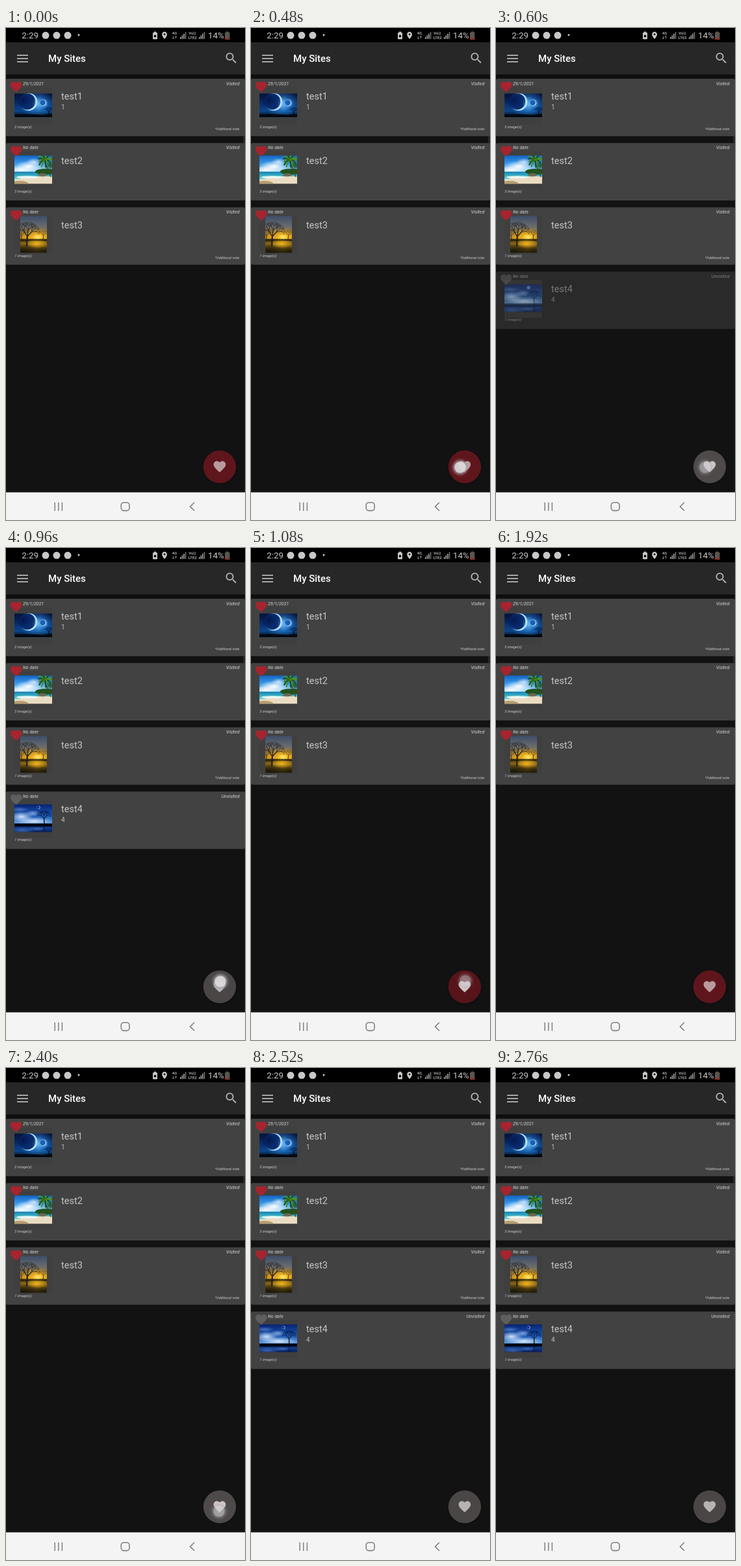
These frames come from a looping animation (368x756 px, 2.88 s). An HTML page with a canvas:

```html
<!DOCTYPE html>
<html lang="en">
<head>
<meta charset="utf-8">
<title>My Sites</title>
<style>
html, body { margin: 0; width: 100%; height: 100%; overflow: hidden; background: #121212; }
canvas { display: block; width: 368px; height: 756px; }
</style>
</head>
<body>
<canvas id="stage"></canvas>
<script>
const W = 368, H = 756, LOOP = 2880, STEP = 120;
const canvas = document.getElementById('stage');
const ctx = canvas.getContext('2d');
const dpr = window.devicePixelRatio || 1;
canvas.width = W * dpr;
canvas.height = H * dpr;

const HEART = new Path2D('M12 21.35l-1.45-1.32C5.4 15.36 2 12.28 2 8.5 2 5.42 4.42 3 7.5 3c1.74 0 3.41.81 4.5 2.09C13.09 3.81 14.76 3 16.5 3 19.58 3 22 5.42 22 8.5c0 3.78-3.4 6.86-8.55 11.54L12 21.35z');
const SEARCH = new Path2D('M15.5 14h-.79l-.28-.27A6.47 6.47 0 0 0 16 9.5 6.5 6.5 0 1 0 9.5 16c1.61 0 3.09-.59 4.23-1.57l.27.28v.79l5 4.99L20.49 19l-4.99-5zm-6 0C7.01 14 5 11.99 5 9.5S7.01 5 9.5 5 14 7.01 14 9.5 11.99 14 9.5 14z');
const PIN = new Path2D('M12 2C8.13 2 5 5.13 5 9c0 5.25 7 13 7 13s7-7.75 7-13c0-3.87-3.13-7-7-7zm0 9.5a2.5 2.5 0 1 1 0-5 2.5 2.5 0 0 1 0 5z');

const CARDS = [
  { title: 'test1', sub: '1', date: '29/1/2021', count: 2, liked: true, note: true, photo: moonNight },
  { title: 'test2', sub: '', date: 'No date', count: 3, liked: true, photo: beach },
  { title: 'test3', sub: '', date: 'No date', count: 1, liked: true, note: true, photo: sunset },
  { title: 'test4', sub: '4', date: 'No date', count: 1, liked: false, photo: blueLake }
];

// Finger marks: time range, position, opacity
const TOUCHES = [
  [480, 600, 322, 675, 0.8], [600, 720, 322, 675, 0.35],
  [960, 1080, 330, 666, 0.8], [1080, 1200, 330, 665, 0.3],
  [2280, 2400, 328, 681, 0.8], [2400, 2520, 328, 681, 0.4]
];

function rect(x, y, w, h, color, r = 0) {
  ctx.fillStyle = color;
  ctx.beginPath();
  ctx.roundRect(x, y, w, h, r);
  ctx.fill();
}

function ellipse(x, y, rx, ry, color) {
  ctx.fillStyle = color;
  ctx.beginPath();
  ctx.ellipse(x, y, rx, ry, 0, 0, 7);
  ctx.fill();
}

function disc(x, y, r, color) {
  ellipse(x, y, r, r, color);
}

function line(points, color, width) {
  ctx.strokeStyle = color;
  ctx.lineWidth = width;
  ctx.beginPath();
  points.forEach(([x, y]) => ctx.lineTo(x, y));
  ctx.stroke();
}

function text(str, x, y, size, color, style = '', align = 'left') {
  ctx.font = `${style} ${size}px Roboto, sans-serif`;
  ctx.textAlign = align;
  ctx.fillStyle = color;
  ctx.fillText(str, x, y);
}

function icon(path, x, y, scale, color) {
  ctx.save();
  ctx.translate(x, y);
  ctx.scale(scale, scale);
  ctx.fillStyle = color;
  ctx.fill(path, 'evenodd');
  ctx.restore();
}

function vertical(y, h, ...stops) {
  const g = ctx.createLinearGradient(0, y, 0, y + h);
  stops.forEach(([at, color]) => g.addColorStop(at, color));
  return g;
}

// Soft round or flattened light; rgb is a "r,g,b" string
function glow(x, y, rx, ry, rgb, alpha) {
  ctx.save();
  ctx.translate(x, y);
  ctx.scale(1, ry / rx);
  const g = ctx.createRadialGradient(0, 0, 0, 0, 0, rx);
  g.addColorStop(0, `rgba(${rgb},${alpha})`);
  g.addColorStop(1, `rgba(${rgb},0)`);
  disc(0, 0, rx, g);
  ctx.restore();
}

function photo(x, y, w, h, paint) {
  ctx.save();
  ctx.translate(x, y);
  ctx.beginPath();
  ctx.rect(0, 0, w, h);
  ctx.clip();
  paint(w, h);
  ctx.restore();
}

function branch(x, y, length, angle, depth, width, color) {
  const x2 = x + Math.cos(angle) * length, y2 = y + Math.sin(angle) * length;
  line([[x, y], [x2, y2]], color, width);
  if (!depth) return;
  for (const turn of [-0.6, 0.08, 0.7])
    branch(x2, y2, length * 0.66, angle + turn, depth - 1, width * 0.6, color);
}

function crescent(x, y, r, light, shade) {
  disc(x, y, r, light);
  disc(x - r * 0.17, y - r * 0.04, r * 0.93, shade);
}

function moonNight(y) {
  photo(13, y + 22.5, 58, 36.5, (w, h) => {
    rect(0, 0, w, h, vertical(0, h, [0, '#051035'], [0.45, '#08306f'], [0.75, '#0a4587'], [0.88, '#06203f'], [1, '#020812']));
    glow(35, 16, 27, 22, '45,145,240', 0.9);
    crescent(22, 13, 13.5, '#b9e3ff', '#082c70');
    glow(14, 10, 14, 12, '4,18,62', 0.7);
    glow(37, 16, 10, 12, '150,215,255', 0.6);
    glow(45, 15, 8, 8, '120,200,255', 0.8);
    crescent(44.5, 14.5, 4.5, '#d5efff', '#1b60b2');
    ellipse(18, 37, 42, 5, '#020812');
    branch(53, 35, 6, -1.6, 3, 1.2, '#020a19');
    ellipse(53, 36, 12, 4, '#020812');
  });
}

function beach(y) {
  photo(13, y + 19, 58, 43.5, (w, h) => {
    rect(0, 0, w, h, vertical(0, h, [0, '#1263c0'], [0.3, '#3c9bea'], [0.55, '#b4e0f8']));
    glow(22, 17, 22, 9, '255,255,255', 1);
    glow(10, 22, 18, 6, '255,255,255', 0.9);
    glow(30, 10, 12, 6, '255,255,255', 0.7);
    rect(0, 25, w, 11, vertical(25, 11, [0, '#1380b4'], [1, '#5ed6cf']));
    ellipse(48, 25, 16, 4.5, '#21511f');
    ellipse(44, 42, 46, 10, '#eadcc2');
    ellipse(20, 33.5, 17, 2, '#eaf8f1');
    ellipse(8, 43, 13, 4, '#b89f72');
    ellipse(43, 30, 7, 2.5, '#6d6a55');
    line([[56, 33], [51, 20], [46, 8]], '#4d4026', 1.3);
    for (let i = 0; i < 13; i++) {
      const a = i * 0.49, reach = 12 + 3 * Math.sin(i * 5);
      ctx.strokeStyle = i % 2 ? '#174e18' : '#4c8f24';
      ctx.lineWidth = 2;
      ctx.beginPath();
      ctx.moveTo(47, 7);
      ctx.quadraticCurveTo(47 + Math.cos(a) * 9, 4 + Math.sin(a) * 6, 47 + Math.cos(a) * reach, 9 + Math.sin(a) * 10);
      ctx.stroke();
    }
    glow(56, 16, 10, 9, '20,75,22', 0.9);
  });
}

function sunset(y) {
  photo(22, y + 13, 41, 57, (w, h) => {
    rect(0, 0, w, h, vertical(0, h, [0, '#3d4c67'], [0.28, '#666b70'], [0.45, '#9c793a'], [0.6, '#d99a16'], [0.66, '#3b2e0e'], [0.74, '#8c6815'], [1, '#29230c']));
    glow(27, 31, 24, 12, '255,190,25', 0.95);
    glow(27, 33, 9, 5, '255,242,130', 0.9);
    rect(0, 36, w, 2.5, '#2a250e');
    glow(25, 43, 18, 7, '255,190,30', 0.9);
    glow(5, 55, 25, 12, '24,22,9', 0.9);
    glow(38, 55, 15, 8, '28,24,8', 0.8);
    branch(10, 47, 15, -1.52, 4, 2.2, '#211d1c');
    branch(35, 38, 7, -1.5, 3, 0.9, '#3b2d1c');
    branch(2, 40, 9, -1.6, 3, 1, '#292420');
  });
}

function blueLake(y) {
  photo(13, y + 19.5, 58, 43, (w, h) => {
    rect(0, 0, w, h, vertical(0, h, [0, '#072372'], [0.4, '#1a56b4'], [0.7, '#6ba6e2'], [0.8, '#123f94'], [1, '#071f5c']));
    glow(11, 19, 17, 8, '225,238,255', 0.9);
    glow(28, 14, 12, 5, '200,222,255', 0.6);
    glow(30, 26, 27, 6, '225,240,255', 0.9);
    glow(8, 8, 15, 4, '130,170,230', 0.5);
    crescent(37, 5, 2.5, '#e4efff', '#0f3589');
    rect(0, 29.5, w, 5, '#020714');
    glow(12, 40, 20, 5, '90,140,215', 0.6);
    glow(35, 38, 15, 3, '110,160,230', 0.5);
    branch(46, 32, 9, -1.62, 4, 1.3, '#030a1c');
    branch(46, 34, 4, 1.6, 2, 1, '#061434');
  });
}

function drawCard(card, index) {
  const y = 78 + index * 98.75;
  rect(0, y, W, 88.3, '#424242', 2.5);
  rect(13, y + 13, 58, 58, '#3f3f3f');
  card.photo(y);
  icon(HEART, 5.2, y + 1.9, 0.87, card.liked ? '#a7242f' : '#5e5e5e');
  text(card.date, 26, y + 9.6, 7, '#d2d2d2', 'italic');
  text(card.liked ? 'Visited' : 'Unvisited', 359.5, y + 9.6, 7, '#d2d2d2', 'italic', 'right');
  text(card.title, 85, y + 32.1, 14.5, '#c6c6c6');
  text(card.sub, 85, y + 47, 10, '#bdbdbd');
  text(`${card.count} image(s)`, 13.3, y + 76.2, 5.7, '#cacaca', 'italic');
  if (card.note) text('*Addtional note', 359.5, y + 79.3, 5.6, '#cacaca', 'italic', 'right');
}

function signal(x) {
  for (let i = 0; i < 4; i++)
    rect(x + i * 2.6, 14 - i * 2.6, 1.5, 2.8 + i * 2.6, i < 3 ? '#b4b4b4' : '#777');
}

function drawStatusBar() {
  const c = '#c8c8c8';
  rect(0, 0, W, 22, '#000');
  text('2:29', 24.3, 16.2, 13.4, c);
  for (const x of [61, 78, 95]) disc(x, 11.3, 5.5, c);
  disc(112, 10.8, 1.5, c);
  rect(226, 7, 7, 10.2, c, 1);
  rect(228, 5.6, 3, 2, c);
  disc(229.5, 12.4, 1.9, '#111');
  icon(PIN, 237.4, 4.7, 0.56, c);
  text('4G', 259.5, 10.2, 6, c, '500', 'center');
  line([[257.5, 12.5], [257.5, 16.5]], '#999', 0.8);
  line([[256, 15], [257.5, 16.7], [259, 15]], '#999', 0.8);
  line([[261.5, 12.5], [261.5, 16.5]], '#999', 0.8);
  line([[260, 14], [261.5, 12.3], [263, 14]], '#999', 0.8);
  signal(268);
  text('Vo))', 287, 10.2, 6, c, '500', 'center');
  text('LTE2', 287.2, 16.7, 6, c, '500', 'center');
  signal(297);
  text('14%', 311, 16.2, 13.4, c);
  rect(337, 6.5, 7.5, 11.5, '#5b5350', 1.2);
  rect(339, 5.4, 3.5, 2, '#5b5350');
  rect(337, 15.5, 7.5, 2.5, '#8d2f25', 1);
}

function drawAppBar() {
  rect(0, 71.5, W, 6.5, vertical(71.5, 6.5, [0, '#0b0b0b'], [1, '#121212']));
  rect(0, 22, W, 49.5, '#272727');
  for (const y of [41, 46, 51]) rect(17, y, 17, 1.8, '#b4b4b4');
  text('My Sites', 65, 52.2, 15, '#fff', '500');
  icon(SEARCH, 335.7, 35.2, 0.93, '#b4b4b4');
}

function drawNavBar() {
  rect(0, 713.5, W, H - 713.5, '#f4f4f4');
  for (const x of [75.2, 80.8, 86.4]) line([[x, 729], [x, 742]], '#808080', 1.5);
  ctx.lineWidth = 1.6;
  ctx.strokeStyle = '#808080';
  ctx.beginPath();
  ctx.roundRect(177.3, 729.2, 12.8, 12.4, 4);
  ctx.stroke();
  line([[290, 729], [283.5, 735.4], [290, 741.8]], '#808080', 1.6);
}

function drawFab(filterOn, pressed) {
  ctx.save();
  ctx.shadowColor = 'rgba(0,0,0,.35)';
  ctx.shadowBlur = 4 * dpr;
  ctx.shadowOffsetY = dpr;
  disc(329, 674.2, 25.2, filterOn ? '#5e161c' : '#494645');
  ctx.restore();
  if (pressed) disc(329, 674.2, 25.2, filterOn ? 'rgba(0,0,0,.08)' : 'rgba(255,255,255,.02)');
  icon(HEART, 317.8, 662.8, 0.93, pressed ? '#cfc3c3' : filterOn ? '#b99b9d' : '#b6b3b2');
}

function drawTouch([, , x, y, alpha]) {
  ctx.save();
  ctx.globalAlpha = alpha;
  glow(x, y, 15, 15, '200,200,215', 0.9);
  disc(x, y, 11.3, 'rgba(150,150,160,.55)');
  disc(x, y, 8.8, '#e6e4e4');
  ctx.restore();
}

function lastCardAlpha(t) {
  if (t >= 600 && t < 720) return 0.5;
  return t >= 720 && t < 1080 || t >= 2520 ? 1 : 0;
}

function draw(t) {
  const touch = TOUCHES.find(([from, to]) => t >= from && t < to);
  const filterOn = !(t >= 600 && t < 1080 || t >= 2400);
  ctx.setTransform(dpr, 0, 0, dpr, 0, 0);
  rect(0, 0, W, H, '#121212');
  drawStatusBar();
  drawAppBar();
  CARDS.forEach((card, i) => {
    ctx.globalAlpha = i < 3 ? 1 : lastCardAlpha(t);
    if (ctx.globalAlpha) drawCard(card, i);
  });
  ctx.globalAlpha = 1;
  rect(365, 91, 3, 107, 'rgba(62,62,62,.5)');
  drawFab(filterOn, touch && touch[4] < 0.5);
  if (touch) drawTouch(touch);
  drawNavBar();
}

const start = performance.now();
function tick(now) {
  const t = Math.max(0, now - start) % LOOP;
  draw(Math.floor(t / STEP) * STEP);
  requestAnimationFrame(tick);
}
tick(start);
</script>
</body>
</html>
```
